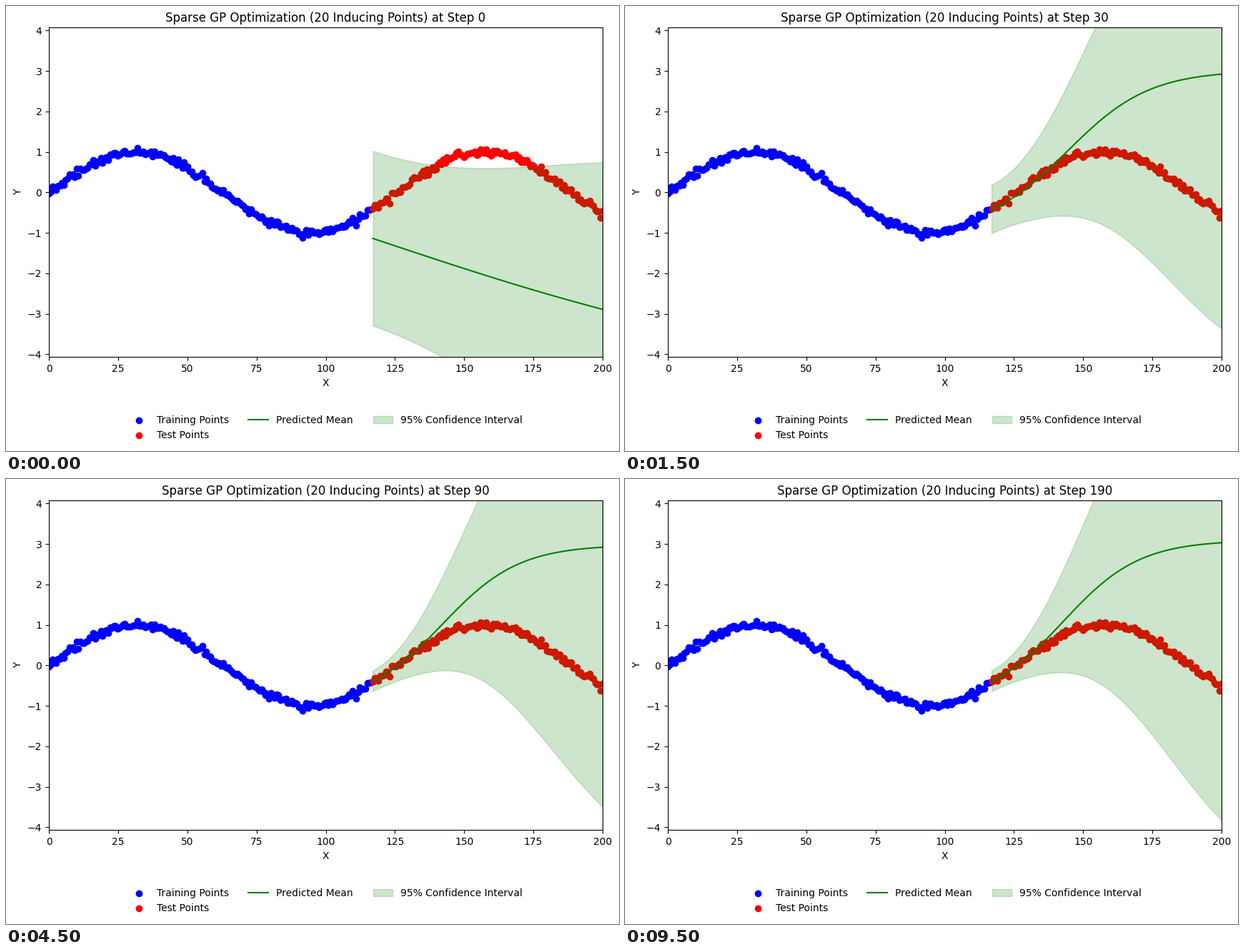
A matplotlib script for the animation above (10000 ms loop, 858 by 624 pixels).

```python
import numpy as np
import matplotlib.pyplot as plt
from matplotlib.animation import FuncAnimation

W, H, DPI = 858, 624, 100
plt.rcParams["font.family"] = "DejaVu Sans"

# Noisy sine, split into training and test points
N, SPLIT = 300, 175
x = np.linspace(0, 200, N)
y = np.sin(x / 20) + np.random.default_rng(4).normal(0, 0.05, N)
x_train, x_test = x[:SPLIT], x[SPLIT:]
u = (x_test - x_test[0]) / (x_test[-1] - x_test[0])

# Key optimizer steps: mean (start, end, steepness, centre),
# then half-width of the interval (start, end, bend)
KEY_STATES = {
    0: (-1.14, -2.89, 1.0, 0.00, 2.16, 3.63, 2.2),
    20: (-0.455, 3.60, 5.0, 0.36, 1.275, 5.94, 2.7),
    30: (-0.42, 2.92, 5.6, 0.33, 0.60, 6.29, 2.5),
    50: (-0.39, 2.86, 6.0, 0.30, 0.26, 6.17, 2.4),
    190: (-0.39, 3.03, 6.0, 0.31, 0.26, 6.86, 2.4),
}


def logistic(t, steepness, centre):
    return 1 / (1 + np.exp(-steepness * (t - centre)))


def s_curve(steepness, centre):
    """Logistic rise rescaled to run from 0 to 1."""
    low, high = logistic(np.array([0, 1]), steepness, centre)
    return (logistic(u, steepness, centre) - low) / (high - low)


def state_at(step):
    start = max(s for s in KEY_STATES if s <= step)
    end = min(s for s in KEY_STATES if s >= step)
    t = (step - start) / max(end - start, 1)
    if start >= 50:
        t **= 0.85  # convergence slows down
    a, b = np.array(KEY_STATES[start]), np.array(KEY_STATES[end])
    return a + (b - a) * t


def prediction(step):
    m0, m1, steepness, centre, h0, h1, bend = state_at(step)
    mean = m0 + (m1 - m0) * s_curve(steepness, centre)
    half = h0 + (h1 - h0) * (1 - np.cos(bend * u)) / (1 - np.cos(bend))
    return mean, mean - half, mean + half


fig = plt.figure(figsize=(W / DPI, H / DPI), dpi=DPI, facecolor="white")
ax = fig.add_axes([60 / W, 131.7 / H, 775 / W, 462 / H])
ax.set(xlim=(0, 200), ylim=(-4.07, 4.07), xlabel="X", ylabel="Y")

mean, lower, upper = prediction(0)
ax.scatter(x_train, y[:SPLIT], color="blue", label="Training Points")
ax.scatter(x_test, y[SPLIT:], color="red", label="Test Points")
mean_line, = ax.plot(x_test, mean, color="green", label="Predicted Mean")
band = ax.fill_between(x_test, lower, upper, color="green", alpha=0.2,
                       label="95% Confidence Interval")
ax.legend(loc="upper center", bbox_to_anchor=(0.5, -0.15), ncol=3, frameon=False)
title = ax.set_title("")


def update(frame):
    step = 10 * frame
    mean, lower, upper = prediction(step)
    mean_line.set_ydata(mean)
    outline = np.concatenate([np.column_stack([x_test, lower]),
                              np.column_stack([x_test, upper])[::-1]])
    band.set_verts([outline])
    title.set_text(f"Sparse GP Optimization (20 Inducing Points) at Step {step}")
    return mean_line, band, title


anim = FuncAnimation(fig, update, frames=20, interval=500, repeat=True)
plt.show()
```
